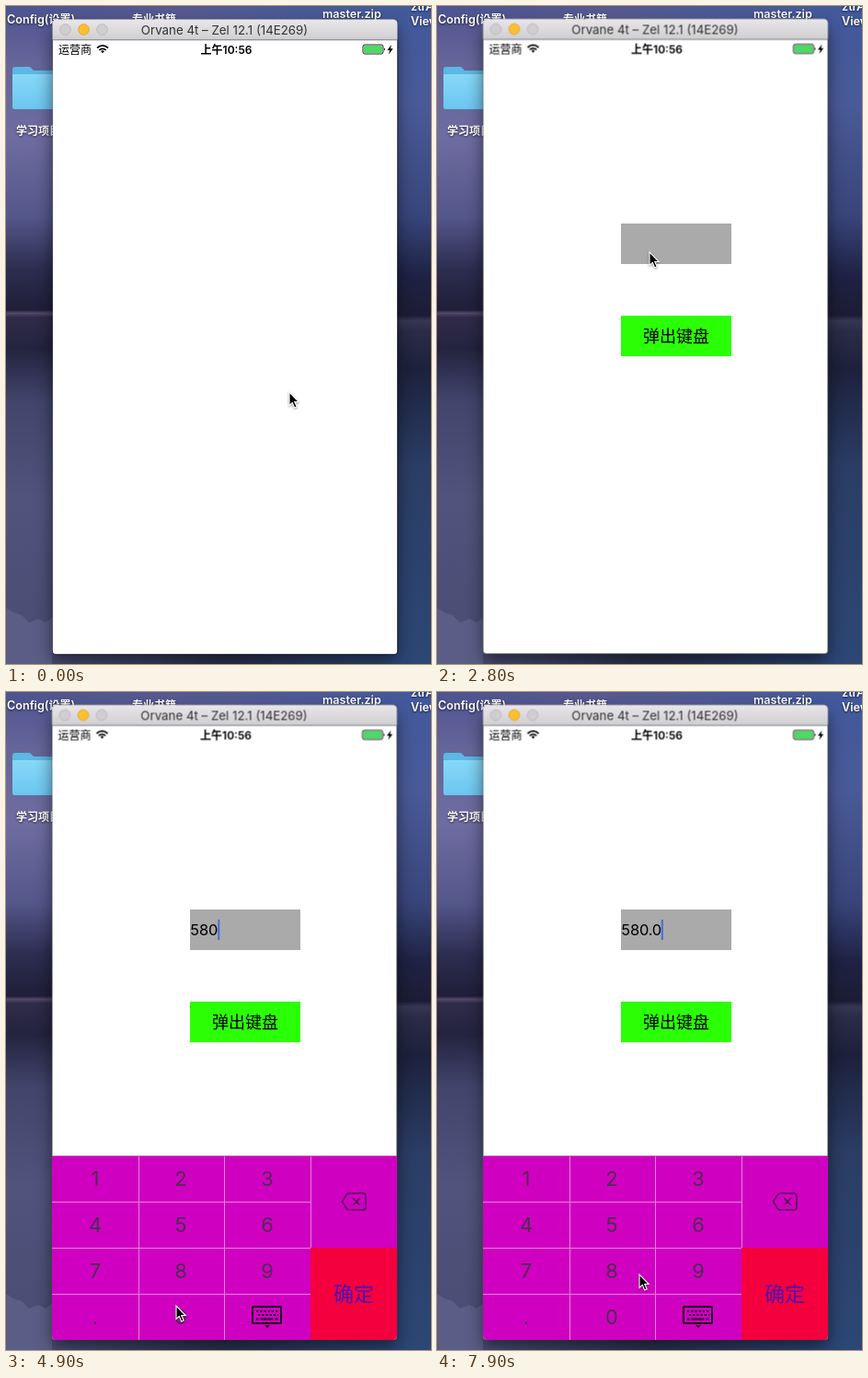
Recreate the animation shown at these times as an HTML page. Size 462 by 714 pixels, loop 8 s.

```html
<!DOCTYPE html>
<html lang="zh">
<head>
<meta charset="utf-8">
<title>Numeric keypad demo</title>
<style>
  html, body { margin: 0; width: 100%; height: 100%; overflow: hidden; background: #23243f; }
  svg { display: block; }
  text { font-family: Inter, "Noto Sans CJK SC", "Noto Sans CJK", sans-serif; }

  .desk text { font-size: 12px; font-weight: 600; fill: #fff; filter: drop-shadow(0 1px 1px #000a); }
  .desk .latin { font-size: 12.6px; }
  .mid { text-anchor: middle; }
  .key { font-size: 22px; fill: #4e2c55; text-anchor: middle; }
  .entry { font-size: 16.5px; letter-spacing: -.2px; }

  .window, .app, .pad, .caret, .entry tspan, .cursor { animation: 8s linear infinite; }
  .window { animation-name: settle; animation-timing-function: step-end; }
  .app { animation-name: appear; }
  .pad { animation-name: rise; }
  .cursor { animation-name: move; animation-timing-function: ease-in-out; }
  .caret { animation-name: step, blink; animation-timing-function: step-end; }
  .entry tspan { animation-timing-function: step-end; }
  .entry :nth-child(1) { animation-name: type5; }
  .entry :nth-child(2) { animation-name: type8; }
  .entry :nth-child(3) { animation-name: type0; }
  .entry :nth-child(4) { animation-name: typeDot; }
  .entry :nth-child(5) { animation-name: typeLast; }

  @keyframes settle { 0% { transform: translate(.5px, .5px); } 3.75%, 100% { transform: none; } }
  @keyframes appear { 0%, 3.75% { opacity: 0; } 6.25%, 100% { opacity: 1; } }
  @keyframes rise {
    0%, 37.5% { transform: translateY(201px); animation-timing-function: cubic-bezier(.2, .8, .2, 1); }
    41.25%, 100% { transform: none; }
  }
  @keyframes type5 { 0% { fill-opacity: 0; } 48.75%, 100% { fill-opacity: 1; } }
  @keyframes type8 { 0% { fill-opacity: 0; } 54.375%, 100% { fill-opacity: 1; } }
  @keyframes type0 { 0% { fill-opacity: 0; } 60%, 100% { fill-opacity: 1; } }
  @keyframes typeDot { 0% { fill-opacity: 0; } 88.125%, 100% { fill-opacity: 1; } }
  @keyframes typeLast { 0% { fill-opacity: 0; } 93.125%, 100% { fill-opacity: 1; } }
  @keyframes step {
    0% { transform: translateX(200px); }
    48.75% { transform: translateX(210px); }
    54.375% { transform: translateX(220px); }
    60% { transform: translateX(230.3px); }
    88.125% { transform: translateX(234.3px); }
    93.125%, 100% { transform: translateX(243.8px); }
  }
  @keyframes blink {
    0%, 44.375%, 67.5%, 82.5% { opacity: 0; }
    36.875%, 48.75%, 75%, 88.125%, 100% { opacity: 1; }
  }
  @keyframes move {
    0%, 1.25% { transform: translate(308px, 419px); }
    8%, 23.75% { transform: translate(270px, 360px); }
    33%, 36.875% { transform: translate(231px, 267px); }
    45% { transform: translate(181px, 602px); }
    47.5%, 50% { transform: translate(185px, 582px); }
    53.5%, 55.5% { transform: translate(186px, 629px); }
    59%, 62.5% { transform: translate(185px, 666px); }
    75%, 88.5% { transform: translate(121px, 667px); }
    92.5%, 94.5% { transform: translate(188px, 671px); }
    98.5%, 100% { transform: translate(220px, 632px); }
  }
</style>
</head>
<body>
<svg width="462" height="714" viewBox="0 0 462 714">
  <defs>
    <linearGradient id="left" x2="0" y2="1">
      <stop offset="0" stop-color="#4e5490"/>
      <stop offset=".09" stop-color="#666699"/>
      <stop offset=".2" stop-color="#6e6ca0"/>
      <stop offset=".32" stop-color="#54578a"/>
      <stop offset=".4" stop-color="#2c2d50"/>
      <stop offset=".462" stop-color="#201e38"/>
      <stop offset=".467" stop-color="#51486a"/>
      <stop offset=".473" stop-color="#302b48"/>
      <stop offset=".52" stop-color="#24233f"/>
      <stop offset=".6" stop-color="#41456c"/>
      <stop offset=".75" stop-color="#50547c"/>
      <stop offset="1" stop-color="#484b72"/>
    </linearGradient>
    <linearGradient id="right" x2="0" y2="1">
      <stop offset="0" stop-color="#41599c"/>
      <stop offset=".15" stop-color="#4a5a98"/>
      <stop offset=".32" stop-color="#38457a"/>
      <stop offset=".41" stop-color="#1e2244"/>
      <stop offset=".47" stop-color="#1d1c35"/>
      <stop offset=".478" stop-color="#343754"/>
      <stop offset=".495" stop-color="#2b2b47"/>
      <stop offset=".55" stop-color="#1c213c"/>
      <stop offset=".7" stop-color="#2b3d65"/>
      <stop offset="1" stop-color="#2c4775"/>
    </linearGradient>
    <linearGradient id="top">
      <stop offset="0" stop-color="#4e5490"/>
      <stop offset=".4" stop-color="#57598f"/>
      <stop offset="1" stop-color="#41599c"/>
    </linearGradient>
    <linearGradient id="bottom">
      <stop offset="0" stop-color="#4a4d73"/>
      <stop offset=".5" stop-color="#2b3150"/>
      <stop offset="1" stop-color="#2c4775"/>
    </linearGradient>
    <linearGradient id="bar" x2="0" y2="1">
      <stop offset="0" stop-color="#e9e7e9"/>
      <stop offset="1" stop-color="#d0ced0"/>
    </linearGradient>
    <linearGradient id="folder" x2="0" y2="1">
      <stop offset="0" stop-color="#86d8f8"/>
      <stop offset="1" stop-color="#6cc6f0"/>
    </linearGradient>
    <filter id="soft" x="-20%" width="140%" y="-10%" height="120%"><feGaussianBlur stdDeviation="9"/></filter>
    <clipPath id="frame"><path d="M50 36V698q0 5 5 5H420q5 0 5-5V36Z"/></clipPath>
  </defs>

  <g class="desk">
    <rect width="231" height="714" fill="url(#left)"/>
    <rect x="231" width="231" height="714" fill="url(#right)"/>
    <rect width="462" height="15" fill="url(#top)"/>
    <path d="M0 653l8 5 9 3 8 8 10-4 8 4 8-6V714H0Z" fill="#5a5e86"/>
    <rect x="50" y="700" width="375" height="14" fill="url(#bottom)"/>
    <path d="M7 69q0-3 3-3h15q2 0 3 2l2 2h30v42H10q-3 0-3-3Z" fill="#5cb7e2"/>
    <path d="M7 74H60v38H10q-3 0-3-3Z" fill="url(#folder)"/>
    <text x="1" y="19"><tspan class="latin">Config(</tspan>设置<tspan class="latin">)</tspan></text>
    <text x="137" y="19">专业书籍</text>
    <text class="latin" x="344" y="13">master.zip</text>
    <text class="latin" x="440" y="5">ztrA</text>
    <text class="latin" x="440" y="21">View</text>
    <text x="11" y="140">学习项目</text>
    <rect x="50" y="24" width="375" height="686" fill="#000" opacity=".5" filter="url(#soft)"/>
  </g>

  <g class="window">
    <rect x="49.5" y="13.5" width="376" height="690" rx="5.500" fill="none" stroke="#000" stroke-opacity=".3"/>
    <path d="M50 36V19q0-5 5-5H420q5 0 5 5V36Z" fill="url(#bar)"/>
    <g stroke-width=".8">
      <circle cx="64" cy="25" r="5.8" fill="#d0ced0" stroke="#b5b3b5"/>
      <circle cx="84" cy="25" r="5.8" fill="#fcbf2f" stroke="#dca124"/>
      <circle cx="104" cy="25" r="5.8" fill="#d0ced0" stroke="#b5b3b5"/>
    </g>
    <text class="mid" x="237" y="30" font-size="13.3" fill="#333">Orvane 4t – Zel 12.1 (14E269)</text>

    <g clip-path="url(#frame)">
      <rect x="50" y="36" width="375" height="667" fill="#fff"/>
      <path d="M50 36.5H425" stroke="#b2b0b2"/>
      <text x="56.5" y="51" font-size="12">运营商</text>
      <g fill="none" stroke="#000" stroke-width="1.7">
        <path d="M98.5 45q6-5.2 12 0M100.8 47.4q3.7-3.2 7.4 0"/>
        <path d="M102.6 48.6q1.9-1.5 3.8 0l-1.9 2.2Z" fill="#000" stroke="none"/>
      </g>
      <text class="mid" x="239" y="51" font-size="12" font-weight="600">上午10:56</text>
      <rect x="387.5" y="41.5" width="22" height="10" rx="2" fill="#fff" stroke="#222"/>
      <rect x="388.5" y="42.5" width="20" height="8" rx="1" fill="#4cd964"/>
      <path d="M410.5 45q2 1.5 0 3Z"/>
      <path d="M418.5 41.5l-4.5 6h2.6l-1 4.5 4.6-6.2h-2.7Z"/>

      <g class="app">
        <rect x="200" y="236" width="120" height="44" fill="#aaa"/>
        <text class="entry" x="200.3" y="264"><tspan>5</tspan><tspan>8</tspan><tspan>0</tspan><tspan>.</tspan><tspan>0</tspan></text>
        <rect class="caret" y="247" width="2" height="22" fill="#466be0"/>
        <rect x="200" y="336" width="120" height="44" fill="#2bff06"/>
        <text class="mid" x="260" y="365" font-size="18">弹出键盘</text>
      </g>

      <g class="pad">
        <rect x="50" y="503" width="375" height="200" fill="#d000c0"/>
        <rect x="331" y="603" width="94" height="100" fill="#f4003e"/>
        <path d="M144.5 503V703M237.5 503V703M331.5 503V603M50 553.5H331M50 603.5H331M50 653.5H331" stroke="#dd82d6"/>
        <path d="M50 503.5H425" stroke="#b65cae"/>
        <g class="key">
          <text x="97" y="536">1</text><text x="190" y="536">2</text><text x="284" y="536">3</text>
          <text x="97" y="586">4</text><text x="190" y="586">5</text><text x="284" y="586">6</text>
          <text x="97" y="636">7</text><text x="190" y="636">8</text><text x="284" y="636">9</text>
          <text x="97" y="686">.</text><text x="190" y="686">0</text>
        </g>
        <path d="M373 544h15q3 0 3 3v12q0 3-3 3h-15q-1.500 0-2.500-1l-5-8 5-8q1-1 2.500-1ZM377 549l8 8m0-8l-8 8" fill="none" stroke="#581058" stroke-width="1.6"/>
        <g stroke="#1c0420" fill="none" stroke-width="2">
          <rect x="268" y="667" width="31" height="18" rx="1"/>
          <path d="M272 672H296M274 676H296" stroke-width="2.2" stroke-dasharray="2.200 2"/>
          <path d="M272 680.500h2.500m2 0h14m2 0h3"/>
          <path d="M281 687h6l-3 3Z" fill="#1c0420" stroke="none"/>
        </g>
        <text class="mid" x="378" y="661" font-size="22" fill="#4a12b8">确定</text>
      </g>
    </g>
  </g>

  <path class="cursor" d="M0 0V14.500L3.300 11.400 5.700 17 8.200 16 5.800 10.500H10.300Z" stroke="#fff" stroke-width="1.1" filter="drop-shadow(0 1px 1px #0006)"/>
</svg>
</body>
</html>
```
